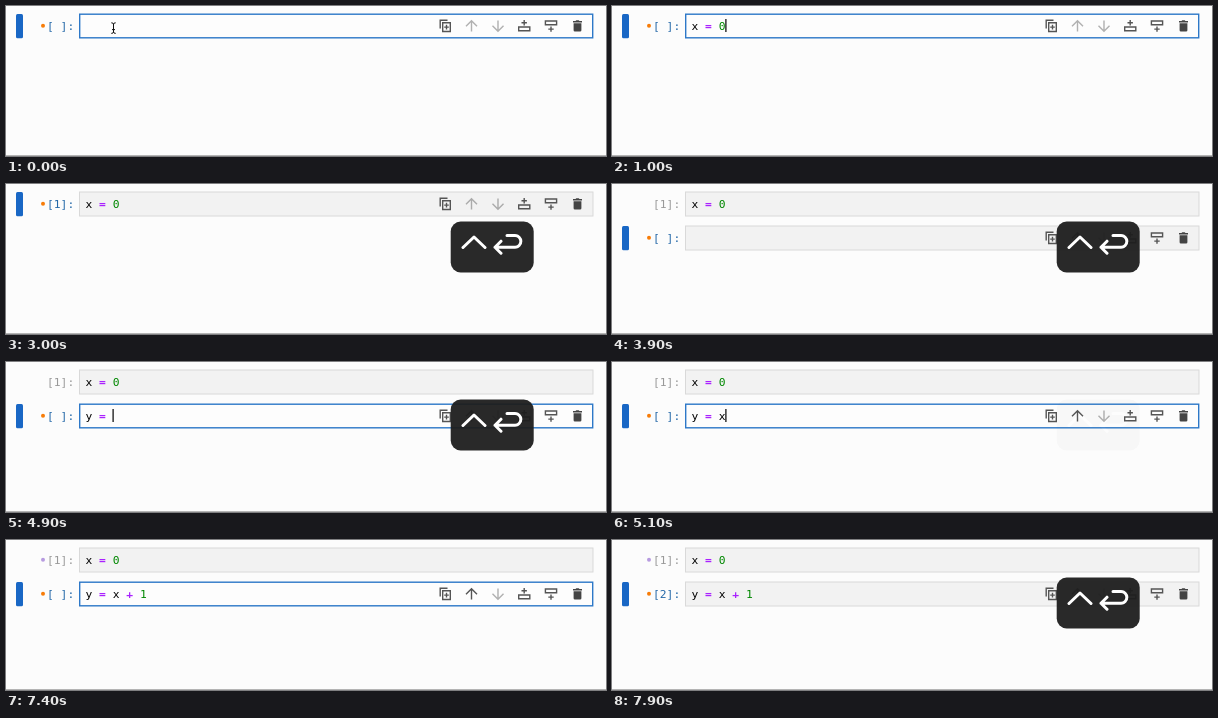
An HTML page that plays this animation: 600x150 px, repeating every 8 s.

```html
<!DOCTYPE html>
<html lang="en">
<head>
<meta charset="utf-8">
<title>Notebook cells</title>
<style>
  html, body { margin: 0; width: 100%; height: 100%; overflow: hidden; background: #fcfcfc; }
  svg { display: block; }
  text { font: 11.3px "DejaVu Sans Mono", monospace; white-space: pre; }
  .op { fill: #a2f; font-weight: bold; }
  .num { fill: #080; }
  .icon, .key { fill: none; stroke: #555; stroke-width: 1.4; }
  .off { opacity: .45; }
  .key { stroke: #fff; stroke-width: 3; stroke-linecap: round; stroke-linejoin: round; }
</style>
</head>
<body>
<svg id="stage" width="600" height="150"></svg>
<script>
const LOOP = 8000, CHAR = 6.8, TEXT_X = 79.5, ROW = 34;
const BLUE = '#1967c5', ORANGE = '#f77c08';
const stage = document.getElementById('stage');

const cells = [
  { code: 'x = 0', keys: [200, 400, 600, 700, 1000],
    born: 0, focus: 200, run: 2800, leave: 3900, count: 1 },
  { code: 'y = x + 1', keys: [4400, 4600, 4800, 4900, 5100, 5800, 6000, 6300, 6800],
    born: 3900, focus: 4200, run: 7700, leave: LOOP + 100, count: 2 }
];

const within = (t, a, b) => t >= a && t < b;
const icon = (d, cls = '') => `<path class="icon ${cls}" d="${d}"/>`;
const rect = (x, y, w, h, fill, extra = '') =>
  `<rect x="${x}" y="${y}" width="${w}" height="${h}" fill="${fill}" ${extra}/>`;

const highlight = s => s.replace(/[=+]|\d/g, c =>
  `<tspan class="${/\d/.test(c) ? 'num' : 'op'}">${c}</tspan>`);

function toolbar(canMoveUp) {
  return icon('M434.2 22.5V14.2H441.5M436.7 16.7H444.3V25.5H436.7ZM440.5 18.8V23.4M438.2 21.1H442.8') +
    icon('M465.5 25.5V15M460 20.3L465.5 14.8L471 20.3', canMoveUp ? '' : 'off') +
    icon('M492 14.5V25M486.5 19.7L492 25.2L497.5 19.7', 'off') +
    icon('M512.7 21H523.8V24.8H512.7ZM518.2 14V19.4M515.5 16.7H520.9') +
    icon('M539.4 15H550.6V18.8H539.4ZM545 20.4V25.8M542.3 23.1H547.7') +
    '<path fill="#444" d="M567 15H569.5L570.3 14.2H572.7L573.5 15H576V16.4H567ZM567.6 17.2H575.4V24.2Q575.4 25.5 574.1 25.5H568.9Q567.6 25.5 567.6 24.2Z"/>';
}

function drawCell(cell, row, t) {
  if (t < cell.born) return '';
  const active = t < cell.leave;
  const editing = (row === 0 || t >= cell.focus) && t < cell.run;
  const typed = cell.keys.filter(k => t >= k).length;
  const since = t - Math.max(cell.focus, ...cell.keys.slice(0, typed));
  const stale = row === 1 && within(t, 5700, 7000);
  const mark = t < cell.run + 100 ? ' ' : t < cell.run + 200 ? '*' : cell.count;
  const dot = active ? ORANGE : t >= 5700 ? '#b79be0' : 'none';

  let out = active ? rect(10, 8, 7, 24.3, stale ? ORANGE : BLUE, 'rx="1.5"') : '';
  out += `<circle cx="37" cy="19.8" r="2" fill="${dot}"/>`;
  out += `<text x="41" y="23.6" fill="${active ? '#2468a8' : '#999'}">[${mark}]:</text>`;
  out += editing
    ? rect(73.7, 8.2, 513, 23.6, '#fdfdfd', 'stroke="#2d78c8" stroke-width="1.4"')
    : rect(73.5, 8, 513.5, 24, '#f2f2f2', 'stroke="#d9d9d9"');
  out += `<text x="${TEXT_X}" y="23.6">${highlight(cell.code.slice(0, typed))}</text>`;
  if (active) out += toolbar(row > 0);
  if (editing && since >= 0 && since % 1300 < 600)
    out += rect(TEXT_X + typed * CHAR - .2, 13, 1.2, 13, '#000');
  return `<g transform="translate(0 ${row * ROW})">${out}</g>`;
}

function drawShortcut(t) {
  const ramp = x => Math.min(1, Math.max(0, x));
  const alpha = t < 6000
    ? ramp((t - 2740) / 150) * ramp((5115 - t) / 200)
    : ramp((t - 7640) / 150);
  return alpha && `<g opacity="${alpha.toFixed(3)}">` +
    rect(444.7, 37.6, 83, 50.8, '#1e1e1e', 'rx="10" fill-opacity=".95"') +
    '<path class="key" d="M457 63.5L468 53L479 63.5M501 51.5H509A5.8 5.8 0 0 1 509 63.2H489M495 57.2L489 63.2L495 69.2"/></g>' || '';
}

const pointer = '<path d="M105.3 16.8Q107.5 16.8 107.5 18.2Q107.5 16.8 109.7 16.8M107.5 18V26.2M105.3 27.4Q107.5 27.4 107.5 26Q107.5 27.4 109.7 27.4M106 23.6H109" fill="none" stroke="#111"/>';

let shown = '';
function frame(now) {
  const t = now % LOOP + 10;
  const picture = cells.map((c, i) => drawCell(c, i, t)).join('') +
    (t < 200 ? pointer : '') + drawShortcut(t) + rect(0, 149, 600, 1, '#b4b4b4');
  if (picture !== shown) stage.innerHTML = shown = picture;
  requestAnimationFrame(frame);
}
frame(performance.now());
</script>
</body>
</html>
```
